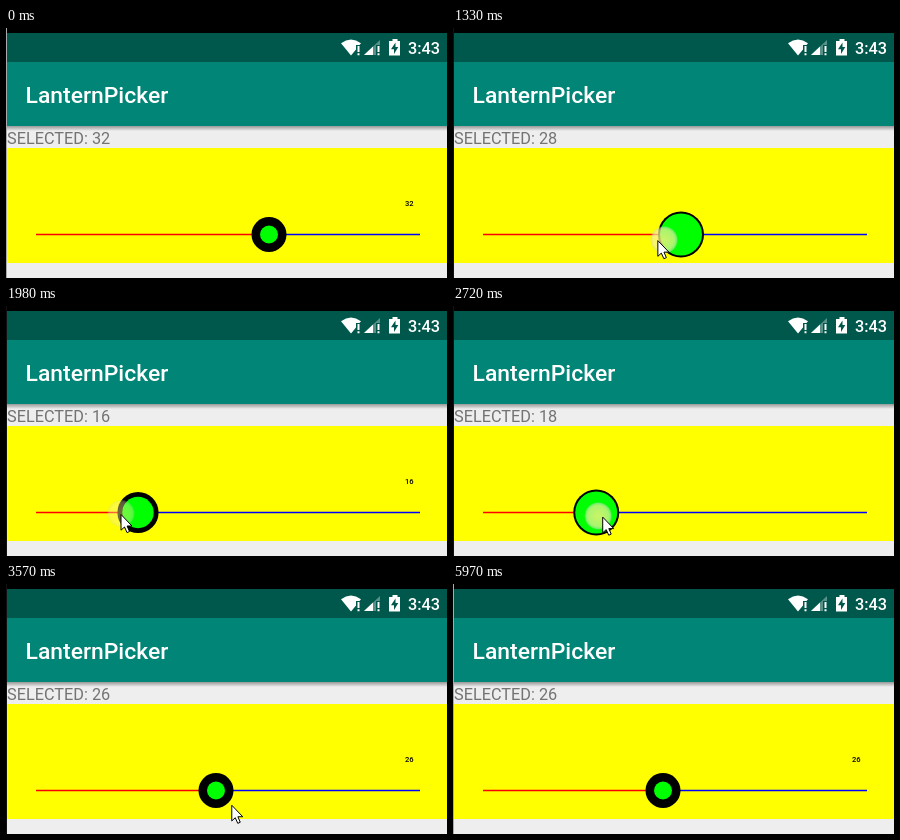
An HTML page for the animation above (6070 ms loop, 441 px wide and 250 px high).

```html
<!DOCTYPE html>
<html lang="en">
<head>
<meta charset="utf-8">
<title>LanternPicker</title>
<style>
  html, body { margin: 0; width: 100%; height: 100%; overflow: hidden; background: #eee; }
  svg { display: block; width: 441px; height: 250px; }
  text { font-family: Roboto, Arial, sans-serif; }
  .bold { font-weight: 500; fill: #fff; }
</style>
</head>
<body>
<svg viewBox="0 0 441 250">
  <defs>
    <linearGradient id="shade" x2="0" y2="1">
      <stop offset="0" stop-opacity=".36"/>
      <stop offset="1" stop-opacity="0"/>
    </linearGradient>
    <radialGradient id="spot">
      <stop offset="0" stop-color="#fff080" stop-opacity=".8"/>
      <stop offset=".75" stop-color="#f8f0a0" stop-opacity=".68"/>
      <stop offset=".9" stop-color="#d8e0c0" stop-opacity=".55"/>
      <stop offset="1" stop-color="#c0ccb0" stop-opacity="0"/>
    </radialGradient>
    <path id="bang" d="M0 0h2v6h-2zM0 7.3h2v2h-2z"/>
  </defs>

  <rect width="441" height="250" fill="#eee"/>
  <rect width="441" height="6" fill="#000"/>
  <rect y="5" width="441" height="29" fill="#00574b"/>
  <rect y="34" width="441" height="64" fill="#008577"/>
  <rect y="98" width="441" height="5" fill="url(#shade)"/>

  <!-- status icons -->
  <g fill="#fff">
    <path d="M335 15.2Q345 8 355 15.2L353.5 17H350V21.5L345 27.5Z"/>
    <use href="#bang" x="351.5" y="18"/>
    <path d="M374 12V17H370V27H358Z" opacity=".35"/>
    <path d="M367 18.5V27H358Z"/>
    <use href="#bang" x="371.5" y="18"/>
    <path d="M386.5 11h5v2h2.5v14.5h-11V13h3.5z"/>
    <path d="M389.5 14.5L385 21.2h3V26l4.3-7h-2.8z" fill="#00574b"/>
  </g>
  <text class="bold" x="402" y="26" font-size="16.3">3:43</text>
  <text class="bold" x="19.5" y="75" font-size="22.9">LanternPicker</text>

  <text id="label" x="1" y="115.5" font-size="16.3" fill="#737373"></text>
  <rect y="120" width="441" height="115" fill="#ff0"/>
  <text id="value" x="399" y="178" font-size="7.6" font-weight="500"></text>
  <path id="left" stroke="#f00" stroke-width="1.7"/>
  <path id="right" stroke="#00f" stroke-width="1.7"/>
  <circle id="rim" cy="206.5"/>
  <circle id="core" cy="206.5" fill="#0f0"/>
  <circle id="touch" r="14" fill="url(#spot)"/>
  <path id="cursor" d="M0 .5V16.2L3.5 13L6 18.6L8.5 17.5L6.1 12H11Z" fill="#fff" stroke="#000"/>
  <rect id="edge" width="1" height="250"/>
</svg>
<script>
  const LOOP = 6070, GROW = 150, LAG = 35;
  const ENTER = 80, EXIT = 4540, END = 5970;

  // Places where the pointer rests
  const stops = [
    { arrive: 0, leave: ENTER, x: 290, y: 250 },
    { arrive: 670, leave: 1045, x: 246, y: 214 },
    { arrive: 1880, leave: 2000, x: 115, y: 208 },
    { arrive: 2350, leave: 2575, x: 134, y: 210 },
    { arrive: 3185, leave: 3250, x: 212, y: 213 },
    { arrive: 3640, leave: 4030, x: 228, y: 222 },
    { arrive: EXIT, leave: LOOP, x: 316, y: 250 }
  ];
  // offset: thumb centre relative to the finger
  const presses = [
    { down: 670, up: 1915, offset: 17 },
    { down: 2400, up: 3240, offset: -2 }
  ];

  const el = id => document.getElementById(id);
  const set = (id, attrs) => {
    for (const k in attrs) el(id).setAttribute(k, attrs[k]);
  };
  const clamp = (v, lo = 0, hi = 1) => Math.min(hi, Math.max(lo, v));
  const mix = (a, b, k) => a + (b - a) * k;
  const ease = k => mix(k, k * k * (3 - 2 * k), 0.4);

  function pointer(t) {
    const i = stops.findLastIndex(s => s.arrive <= t);
    const a = stops[Math.max(i, 0)], b = stops[i + 1] || a;
    const k = ease(clamp((t - a.leave) / (b.arrive - a.leave)));
    return { x: mix(a.x, b.x, k), y: mix(a.y, b.y, k) };
  }

  function draw(t) {
    const press = presses.findLast(p => p.down <= t) || presses[0];
    const held = t >= press.down && t < press.up;
    const size = Math.min(clamp((t - press.down) / GROW), clamp(1 - (t - press.up) / GROW));

    const tip = pointer(t), finger = pointer(t - LAG);
    const x = pointer(clamp(t - LAG, press.down, press.up)).x + press.offset;
    const num = Math.round(4 + 46 * (x - 30) / 384);

    el('label').textContent = 'SELECTED: ' + num;
    el('value').textContent = held ? '' : num;
    set('left', { d: `M30 206.5H${x}` });
    set('right', { d: `M${x} 206.5H414` });
    set('rim', { cx: x, r: mix(17.5, 23, size) });
    set('core', { cx: x, r: mix(9, 21, size) });
    set('touch', { cx: finger.x, cy: finger.y - 0.5, opacity: size });
    set('cursor', {
      transform: `translate(${tip.x} ${tip.y})`,
      visibility: t >= ENTER && t < EXIT ? 'visible' : 'hidden'
    });
    set('edge', { fill: t >= ENTER && t < END ? '#111' : '#aaa' });
  }

  const start = performance.now();
  function tick() {
    draw((performance.now() - start) % LOOP);
    requestAnimationFrame(tick);
  }
  tick();
</script>
</body>
</html>
```
